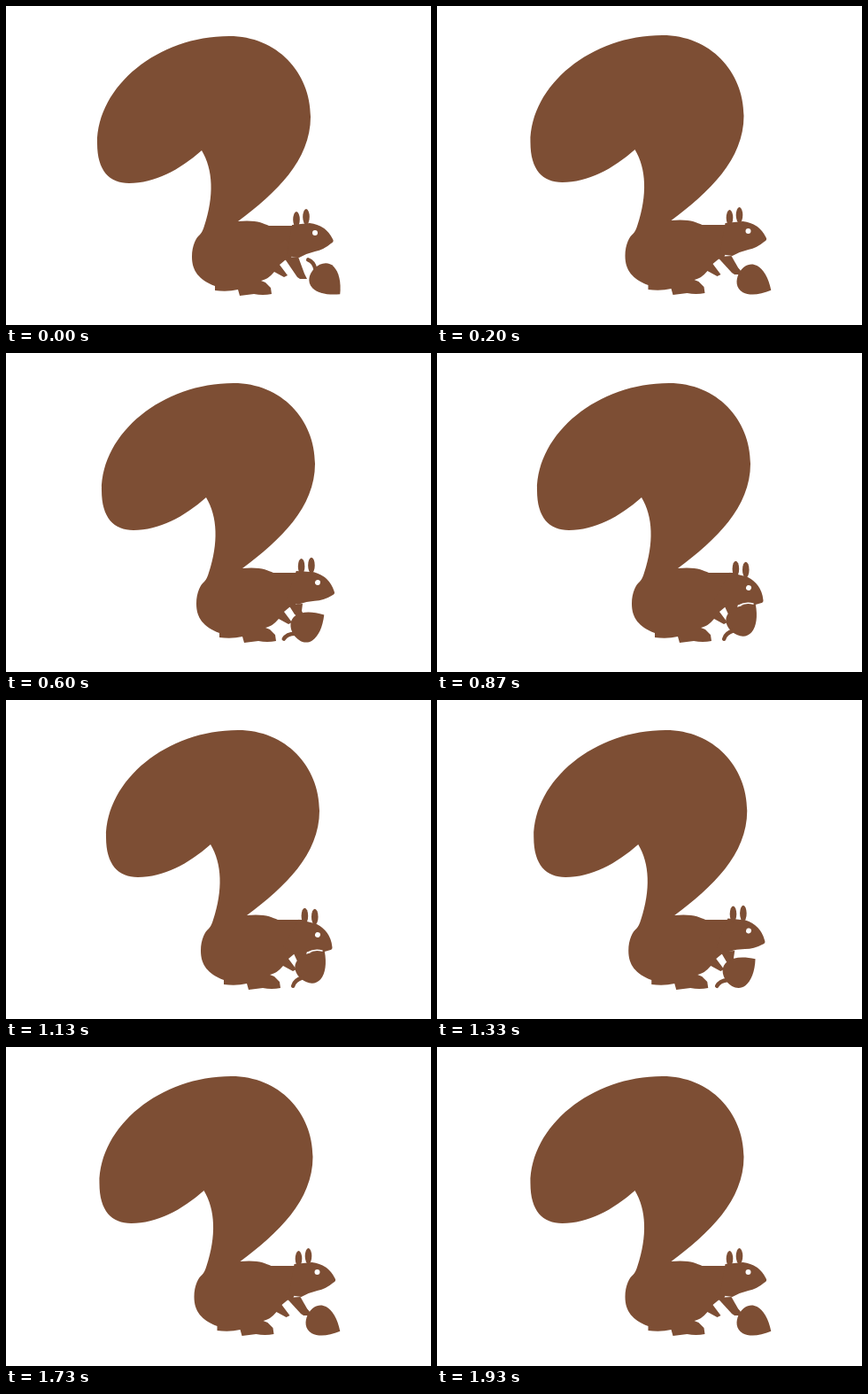
These frames come from a looping animation (480x360 px, 1.99 s). An HTML page with a canvas:

```html
<!DOCTYPE html>
<html lang="en">
<head>
<meta charset="utf-8">
<title>Squirrel</title>
<style>
html, body { margin: 0; width: 100%; height: 100%; overflow: hidden; background: #fff; }
canvas { display: block; }
</style>
</head>
<body>
<canvas id="stage" width="480" height="360"></canvas>
<script>
const ctx = document.getElementById('stage').getContext('2d');
const BROWN = '#7d4e34', LOOP = 1990, STEPS = 30;

// Tail, trunk, feet and short foreleg, which shift as one piece
const body = new Path2D(`M221 163C196 185 168 200 139 200C117 200 103 186 103 155
  C103 90 172 34 252 34C306 34 344 75 344 125C344 174 305 211 262 243
  C282 241 290 245 297 248H325L329 265L322 284L315 287L309 292L318 304L314 306L303 300
  C298 306 293 309 288 310L293 312L299 318L300 325Q290 327 280 325L264 327L262 320
  Q250 323 236 321V316C218 309 210 299 210 283C210 270 215 261 219 258Q222 255 224 248
  C235 214 234 185 221 163Z`);

// Head without ears, around the eye
const head = new Path2D('M-26 -9L-6 -11Q12 -9 20 7Q22 10 18 12Q10 19 0 21Q-9 23 -18 28L-32 26Z');

// Acorn around its centre, tip to the right
const acorn = new Path2D('M23 0C14 11 4 17 -4 17C-13 17 -18 9 -18 0C-18 -9 -13 -17 -4 -17C4 -17 14 -11 23 0Z');
const stem = new Path2D('M-16 0Q-24 -5 -30 -2');

const ramp = (v, from, to) => Math.min(1, Math.max(0, (v - from) / (to - from)));

function place(x, y, angle, paint) {
  ctx.save();
  ctx.translate(x, y);
  ctx.rotate(angle);
  paint();
  ctx.restore();
}

function ellipse(x, y, rx, ry, angle = 0) {
  ctx.beginPath();
  ctx.ellipse(x, y, rx, ry, angle, 0, 2 * Math.PI);
  ctx.fill();
}

function drawArm(dx, dy, x, y) {
  ctx.beginPath();
  ctx.moveTo(314 + dx, 284 + dy);
  ctx.lineTo(x - 6, y + 1);
  ctx.lineTo(x - 3, y + 3);
  ctx.lineTo(x + 5, y + 3);
  ctx.lineTo(x + 2, y - 3);
  ctx.lineTo(330 + dx, 283 + dy);
  ctx.fill();
}

function draw(step) {
  // The second half of the loop runs the three moves backwards
  const s = Math.min(step, STEPS - step);
  const reach = ramp(s, 0, 1), lift = ramp(s, 4, 8), nibble = ramp(s, 9, 13);
  const rad = Math.PI / 180;
  const dx = 2.5 * reach + 2.5 * lift + 5 * nibble;
  const dy = lift - reach;
  const tilt = (9 * lift + 11 * nibble) * rad;

  ctx.fillStyle = '#fff';
  ctx.fillRect(0, 0, 480, 360);
  ctx.fillStyle = ctx.strokeStyle = BROWN;
  ctx.lineCap = 'round';
  ctx.lineWidth = 4.5;

  place(dx, dy, 0, () => ctx.fill(body));
  drawArm(dx, dy, 335 + 4 * reach - 7 * lift + 4 * nibble, 305 - 5 * reach - 6 * lift + 2 * nibble);

  const turn = (45 - 17 * reach - 61 * lift - 17 * nibble) * rad;
  place(361 - 4 * reach - 17 * lift + 5 * nibble, 309 + reach - 2 * lift - 7 * nibble, turn, () => {
    ctx.fill(acorn);
    ctx.stroke(stem);
  });

  place(349 + 2.5 * reach + lift / 2, 256 - 2 * reach + 5 * lift + 6 * nibble, tilt, () => {
    ctx.fill(head);
    // Ears stay upright while the head tilts
    ellipse(-21, -15, 3.8, 9, -tilt);
    ellipse(-10, -18, 3.8, 9, -tilt);
    ctx.fillStyle = '#fff';
    ellipse(0, 0, 3, 3);
  });

  // Gap between chin and acorn while nibbling
  if (nibble === 1) {
    ctx.strokeStyle = '#fff';
    ctx.lineWidth = 1.5;
    ctx.beginPath();
    ctx.moveTo(341, 285);
    ctx.quadraticCurveTo(348, 281, 357, 283);
    ctx.stroke();
  }
}

function tick() {
  draw(Math.floor(performance.now() % LOOP / LOOP * STEPS));
  requestAnimationFrame(tick);
}
tick();
</script>
</body>
</html>
```
